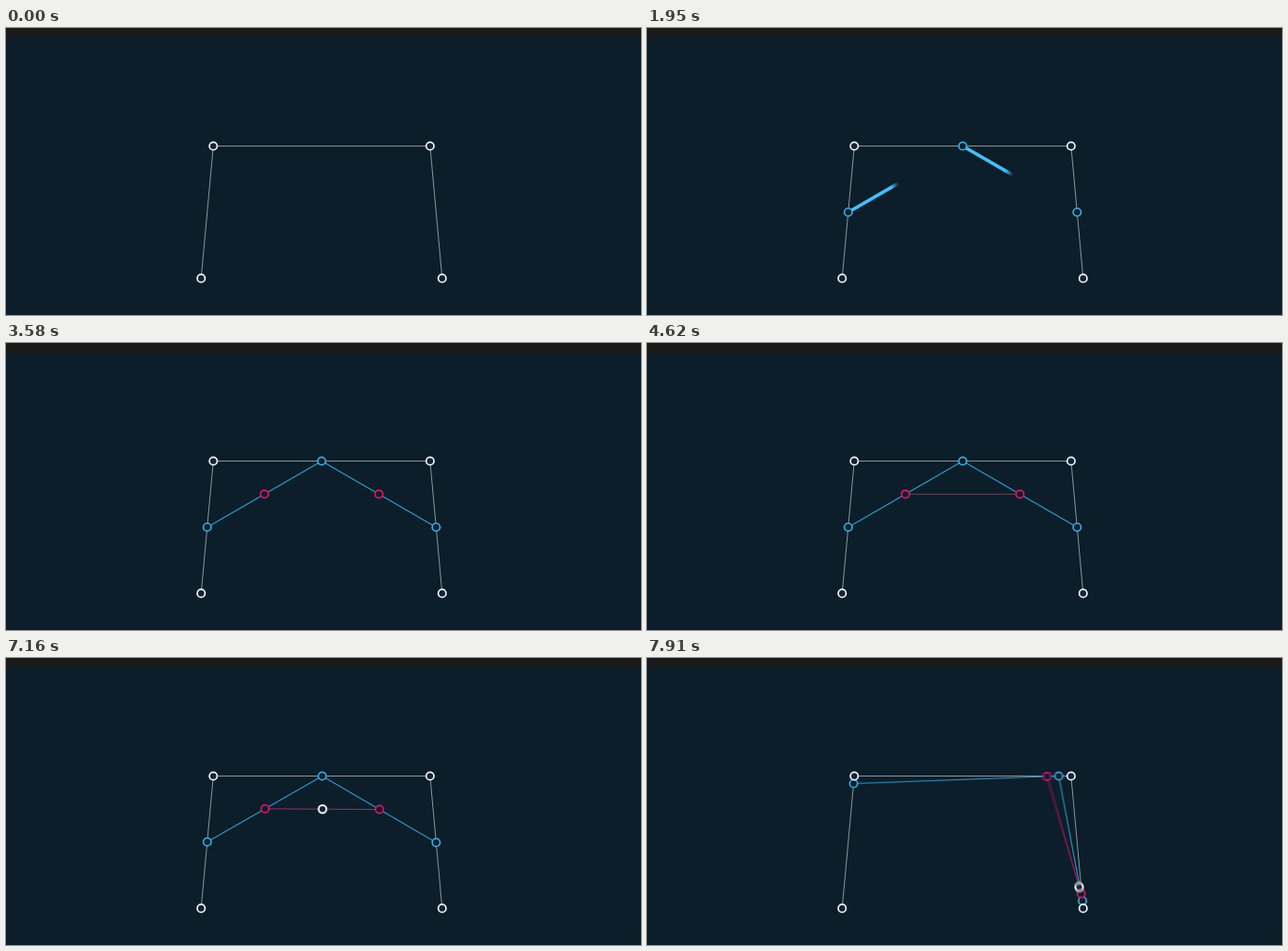
An HTML page with a canvas that plays this animation: 684x310 px, repeating every 8 s.

```html
<!DOCTYPE html>
<html lang="en">
<head>
<meta charset="utf-8">
<title>Cubic curve construction</title>
<style>
html, body { margin: 0; width: 100%; height: 100%; overflow: hidden; background: #0b1e29; }
canvas { display: block; }
</style>
</head>
<body>
<canvas id="stage" width="684" height="310"></canvas>
<script>
const W = 684, H = 310, LOOP = 8000;
const BG = '#0b1e29', WHITE = '#f4f5f7', BLUE = '#35aee6', PINK = '#d8176a';
const ctrl = [[210.2, 270.4], [223.3, 127.5], [456.8, 127.5], [469.8, 270.4]];

// Moments at which the picture steps to a new pose
const steps = [0, 750, 900, 1050, 1200, 1950, 2100, 2240, 3290, 3440, 3580,
  4170, 4320, 4470, 4620, 6260, 6410, 6560, 6710,
  7160, 7310, 7460, 7610, 7760, 7910];

const out = document.getElementById('stage').getContext('2d');
const layer = document.createElement('canvas');
layer.width = W;
layer.height = H;
const g = layer.getContext('2d');

const clamp = x => Math.max(0, Math.min(1, x));
const smooth = x => x * x * (3 - 2 * x);
const mix = (a, b, k) => [a[0] + (b[0] - a[0]) * k, a[1] + (b[1] - a[1]) * k];
const between = (pts, k) => pts.slice(1).map((p, i) => mix(pts[i], p, k));

function line(a, b, color, width) {
  g.strokeStyle = color;
  g.lineWidth = width;
  g.beginPath();
  g.moveTo(...a);
  g.lineTo(...b);
  g.stroke();
}

function ring(p, r, color, width, fill) {
  g.beginPath();
  g.arc(p[0], p[1], r, 0, Math.PI * 2);
  if (fill) {
    g.fillStyle = fill;
    g.fill();
  }
  g.strokeStyle = color;
  g.lineWidth = width;
  g.stroke();
}

// A line drawn by a bright streak that leaves a thin trace
function sweep(a, b, age, thin, bright, width) {
  if (age < 0) return;
  const u = clamp(age / 350);
  if (u === 1) return line(a, b, thin, width);
  const tail = mix(a, b, clamp((u - 0.3) / 0.7) ** 2);
  const head = mix(a, b, u * (1.75 - 0.75 * u));
  const len = Math.hypot(head[0] - tail[0], head[1] - tail[1]);
  const fade = g.createLinearGradient(...tail, ...head);
  fade.addColorStop(0, bright);
  fade.addColorStop(clamp(1 - 9 / len), bright);
  fade.addColorStop(1, bright + '00');
  line(a, tail, thin, width);
  line(tail, head, fade, 3.6);
}

// A point that appears with an expanding, thinning ring
function pop(p, age, color, width, fill) {
  if (age < 0) return;
  const u = age / 400;
  if (u < 1) {
    const outer = 5 + 10.5 * (1 - (1 - u) ** 4);
    const inner = 4 + 11.5 * u;
    ring(p, (outer + inner) / 2, color, outer - inner);
  }
  ring(p, 4.2, color, width, fill);
}

function scene(t) {
  const k = 0.5 + 0.5 * smooth(clamp((t - 7120) / 1000));
  const blue = between(ctrl, k);
  const pink = between(blue, k);
  const [tip] = between(pink, k);

  g.fillStyle = BG;
  g.fillRect(0, 0, W, H);
  g.fillStyle = '#1a1a1a';
  g.fillRect(0, 0, W, 11);

  for (let i = 0; i < 3; i++) line(ctrl[i], ctrl[i + 1], '#8b959c', 1);
  for (let i = 0; i < 2; i++)
    sweep(blue[i], blue[i + 1], t - 1850, '#2c9fd6', '#40c0ff', 1.1);
  const thinPink = t < 7160 ? '#74405a' : '#c8175e';
  sweep(pink[0], pink[1], t - 4130, thinPink, '#e8186c', 1.1);

  for (const p of blue) pop(p, t - 720, BLUE, 1.7, BG);
  for (const p of pink) pop(p, t - 3170, PINK, 1.8, BG);
  for (const p of ctrl) ring(p, 4.2, WHITE, 1.7, '#142338');
  pop(tip, t - 6200, WHITE, 2.1, '#142338');
}

function frame(now) {
  const time = now % LOOP;
  const t = steps.filter(s => s <= time).pop();
  // Average a few moments for motion blur while the construction moves
  const samples = t >= 7160 ? 6 : 1;
  for (let i = 0; i < samples; i++) {
    scene(samples > 1 ? t + (i / (samples - 1) - 0.5) * 16 : t);
    out.globalAlpha = 1 / (i + 1);
    out.drawImage(layer, 0, 0);
  }
  requestAnimationFrame(frame);
}
requestAnimationFrame(frame);
</script>
</body>
</html>
```
